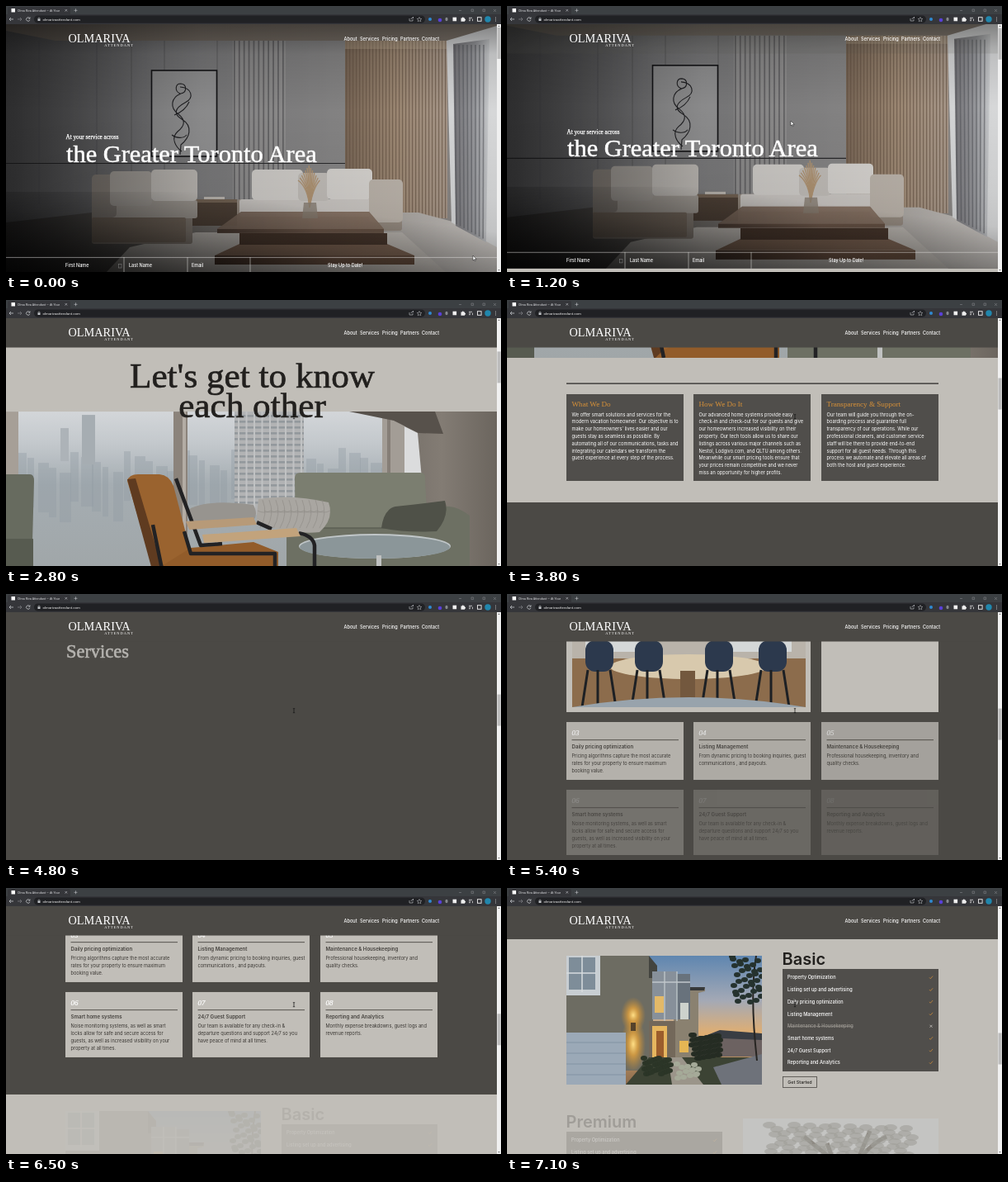
Animation, 600 px wide and 322 px high, one loop 7200 ms. Source, as an HTML page:

```html
<!DOCTYPE html>
<html lang="en">
<head>
<meta charset="utf-8">
<title>Scrolling site</title>
<style>
html, body { margin: 0; width: 600px; height: 322px; overflow: hidden; background: #4b4945 }
svg { display: block }
text { font-family: Inter, "Open Sans", sans-serif; white-space: pre }
.serif { font-family: "Liberation Serif", "Noto Serif", serif }
.ui { font-family: Roboto, "Open Sans", sans-serif }
</style>
</head>
<body>
<svg id="stage" width="600" height="322" viewBox="0 0 600 322"></svg>
<script>
const LIGHT = '#c1beb8', DARK = '#4b4945', PANEL = '#504e4b', INK = '#22201e', GOLD = '#c88a3c';

const rect = (x, y, w, h, fill, more = '') => `<rect x="${x}" y="${y}" width="${w}" height="${h}" fill="${fill}" ${more}/>`;
const path = (d, fill, more = '') => `<path d="${d}" fill="${fill}" ${more}/>`;
const line = (d, stroke, width = 1, more = '') => path(d, 'none', `stroke="${stroke}" stroke-width="${width}" ${more}`);
const oval = (x, y, rx, ry, fill, more = '') => `<ellipse cx="${x}" cy="${y}" rx="${rx}" ry="${ry}" fill="${fill}" ${more}/>`;
const text = (x, y, size, str, fill, more = '') =>
  `<text x="${x}" y="${y}" font-size="${size}" fill="${fill}" ${more}>${str.replace(/&/g, '&amp;')}</text>`;
const serif = (x, y, size, str, fill, bold = 0, more = '') =>
  text(x, y, size, str, fill, `class="serif" stroke="${fill}" stroke-width="${bold}" ${more}`);
const lines = (x, y, list, fill) => list.split('|').map((s, i) => text(x, y + i * 8.8, 5.65, s, fill)).join('');
const repeat = (n, draw) => Array.from({ length: n }, (_, i) => draw(i)).join('');
const fade = (start, length, inner) => `<g data-start="${start}" data-length="${length}">${inner}</g>`;
const grad = (id, dir, ...stops) => `<linearGradient id="${id}" ${dir}>` + stops.map(([at, color, alpha = 1]) =>
  `<stop offset="${at}" stop-color="${color}" stop-opacity="${alpha}"/>`).join('') + '</linearGradient>';
const across = 'x1="0" x2="1" y1="0" y2="0"', down = 'x1="0" x2="0" y1="0" y2="1"';

const defs = '<defs>' +
  grad('wall', across, [0, '#59595b'], [.3, '#808082'], [.7, '#8c8b8b'], [1, '#8a8683']) +
  grad('wood', across, [0, '#7d6a59'], [.5, '#a08b76'], [1, '#a8988a']) +
  grad('drape', across, [0, '#77767a'], [.6, '#96979b'], [1, '#c9cbcd']) +
  grad('floor', across, [0, '#3d3b3a'], [.5, '#8a8580'], [1, '#c9c5c1']) +
  grad('shade', across, [0, '#000', .5], [.4, '#000', .12], [1, '#000', 0]) +
  grad('sink', down, [0, '#000', .4], [.12, '#000', .12], [.35, '#000', 0], [.7, '#000', .05], [1, '#000', .15]) +
  grad('corner', 'x1="0" x2=".8" y1="1" y2="0"', [0, '#000', .85], [.5, '#000', .25], [.8, '#000', 0]) +
  grad('table', across, [0, '#46342a'], [.6, '#6f5545'], [1, '#644c3c']) +
  grad('city', down, [0, '#d3d6d9'], [.2, '#c3c8cc'], [.45, '#a5adb2'], [1, '#a0a6a8']) +
  grad('concrete', across, [0, '#77716a'], [.4, '#837c74'], [1, '#6b655e']) +
  grad('dusk', down, [0, '#5f86b0'], [.35, '#a4a9b5'], [.6, '#dfae72'], [1, '#8a6a4d']) +
  '<radialGradient id="glow"><stop offset="0" stop-color="#ffdf86"/><stop offset=".4" stop-color="#e3a23c" stop-opacity=".8"/><stop offset="1" stop-color="#c98a2c" stop-opacity="0"/></radialGradient>' +
  '<clipPath id="photo"><rect y="430" width="595" height="195"/></clipPath>' +
  '<clipPath id="house"><rect x="72" y="1293" width="237" height="156"/></clipPath>' +
  '<clipPath id="dining"><rect x="79" y="905" width="283" height="144"/></clipPath></defs>';

function hero() {
  const figure = 'M211 106c-7-3-6-12 1-12 8 1 7 11 0 12-12 5-14 17-3 25 9 7 8 14-1 21-9 8-2 19 5 24m-2-78c14 1 18 13 6 19-13 7-14 14-4 20 15 9 9 23-1 31l-1 12m-7-48c8-3 15-9 18-16m-21 40c5 4 14 5 18 0';
  const cushion = (x, y, w, h, fill) => rect(x, y, w, h, fill, 'rx="5"');
  return rect(0, 22, 595, 250, 'url(#wall)') +
    path('M0 22H595V28L535 42H60L0 30z', '#7d746b') +
    line('M40 42V240M110 42V235M152 42V235M192 42V235M256 42V190', '#5a5a5c', .7) +
    rect(275, 42, 64, 192, '#959494') + repeat(11, i => rect(276 + i * 5.9, 42, 1.7, 192, '#69686a')) +
    line('M0 190.5H411', '#2a2a2c', 1.2) +
    rect(411, 42, 124, 215, 'url(#wood)') + repeat(31, i => rect(412 + i * 4, 42, 1.2, 215, '#6a5848', 'opacity=".7"')) +
    rect(411, 42, 124, 10, '#d8c3a6', 'opacity=".3"') +
    path('M0 262L104 250H500L545 262L595 285V324H0z', 'url(#floor)') +
    path('M534 42L595 24V292L540 262z', '#d6d7d8') +
    path('M542 46L586 40L582 286L545 266z', 'url(#drape)') +
    repeat(8, i => line(`M${544 + i * 5} 47L${546 + i * 4.6} ${264 + i * 2.5}`, '#55565b', 1.5, 'opacity=".6"')) +
    rect(176.5, 78, 79, 104, '#9c9c9d', 'stroke="#161618" stroke-width="1.6"') +
    line(figure, '#232326', 1.1) +
    path('M150 292L230 274H480L535 324H120z', '#c2bdb7') +
    rect(213, 234, 67, 32, '#54463b') + rect(213, 234, 67, 4, '#796858') + rect(240, 231, 25, 3, '#c8c3bc') +
    rect(104, 238, 122, 50, '#8d847b', 'rx="3"') + rect(128, 235, 104, 22, '#aaa49d', 'rx="3"') +
    rect(104, 256, 114, 30, '#7d7064', 'rx="2"') +
    cushion(104, 204, 30, 52, '#8d867f') + cushion(126, 200, 51, 42, '#ada8a2') + cushion(176, 198, 56, 38, '#c6c2bd') +
    rect(280, 234, 200, 38, '#9c9186', 'rx="3"') + rect(283, 234, 186, 21, '#d2ceca', 'rx="3"') +
    cushion(298, 198, 62, 37, '#dad7d3') + cushion(354, 202, 38, 34, '#c9c5c0') + cushion(389, 197, 55, 37, '#dcd9d5') +
    cushion(440, 210, 41, 52, '#bfb7ae') +
    path('M283 288H462L495 302H253z', '#7d6453') + rect(253, 302, 242, 11, 'url(#table)') +
    rect(283, 275, 179, 14, '#4b392e') +
    path('M285 249H440L458 270V275H256V270z', 'url(#table)', 'opacity=".85"') +
    path('M285 249H440L458 270H256z', '#9b8779', 'opacity=".6"') +
    repeat(13, i => line(`M368 244Q${366 + i * .5} 220 ${354 + i * 2.2} ${193 + Math.abs(6 - i) * 3}`, '#b79a78', 1.4)) +
    path('M361 238h15l2 19h-19z', '#8f8478', 'opacity=".8"') +
    rect(0, 22, 595, 302, 'url(#shade)') + rect(0, 22, 595, 302, 'url(#sink)') + rect(0, 225, 595, 99, 'url(#corner)') +
    serif(72.5, 161, 7.2, 'At your service across', '#fff', .25) +
    serif(73, 188.5, 30.4, 'the Greater Toronto Area', '#fff', .5) +
    line('M0 304.4H595M143 304V324M220 304V324M296 304V324', '#e4e2df', .6, 'opacity=".85"') +
    [[72, 'First Name'], [149, 'Last Name'], [225, 'Email'], [390, 'Stay Up to Date!']]
      .map(([x, s]) => text(x, 316.4, 5.5, s, '#fff', 'font-weight="500"')).join('') +
    rect(136.5, 312.5, 3.5, 4.5, 'none', 'stroke="#777" stroke-width=".6"');
}

function lounge() {
  const block = i => rect(i * 13, 474 + (i * 37 % 31), 7 + i * 5 % 9, 60, '#929ca3', 'opacity=".4"');
  return '<g clip-path="url(#photo)">' + rect(0, 430, 595, 195, 'url(#city)') + repeat(36, block) +
    rect(92, 434, 16, 60, '#a6adb2') + rect(66, 450, 10, 40, '#adb3b8') +
    rect(277, 430, 84, 125, '#b2b3b4') + repeat(16, i => rect(277, 434 + i * 7, 84, 2.5, '#92989c')) +
    repeat(9, i => rect(281 + i * 9.5, 430, 2, 120, '#c0c2c3')) +
    rect(0, 430, 15, 195, '#a69f97') + rect(203, 430, 17, 195, '#8b837b') + rect(214, 430, 4, 195, '#b3aca4') +
    rect(456, 430, 27, 195, '#a39d96') + rect(462, 430, 4, 195, '#857e77') +
    path('M483 430H595V625H483z', 'url(#concrete)') + path('M483 448L499 456L507 545H483z', '#dbdcdd') +
    path('M416 430H520L530 457L500 456L470 441z', '#57514b') +
    path('M350 510Q350 504 357 504H502Q509 504 508 512L512 590H351z', '#7b7e70') +
    path('M340 570H512V548Q540 538 562 556V625H340z', '#6d7063') + line('M350 571H510', '#585b4f') +
    path('M0 506H29Q34 506 34 514L31 625H0z', '#676b5f') + rect(0, 584, 33, 41, '#575b50') +
    path('M455 571Q458 548 472 545Q500 542 532 538Q538 556 522 575Q485 577 455 571z', '#4f5148') +
    path('M219 550Q240 535 300 543Q309 560 291 568H225z', '#97948f') +
    path('M306 536Q345 529 391 540Q398 560 380 576Q345 579 303 565z', '#a9a6a1') +
    repeat(10, i => line(`M${311 + i * 8} 537q7 17 -3 34M${305 + i * 8} 550q8 4 16 0`, '#8d8a85', .6)) +
    oval(447, 593, 92, 15, '#c0c6c8') + oval(447, 594, 91, 14, '#8b9699') + line('M452 604V625', '#c0c2c1', 6) +
    path('M147 514Q149 506 160 506H186Q198 507 203 520L224 600V625H180z', '#9a632f') +
    path('M147 512L157 511L191 625H178z', '#5f3b20') + path('M187 618L224 595L300 588L330 600V625H180z', '#925c2a') +
    line('M206 511L236 592L262 590M178 567L190 625M216 575L224 602H326V625M304 564L322 572M355 577Q372 580 374 592V625', '#222224', 4.5, 'stroke-linejoin="round"') +
    path('M218 563L300 558L304 567L222 573z', '#b79a78') + path('M238 579L352 571L357 581L240 589z', '#c2a37c') + '</g>';
}

function dining() {
  return '<g clip-path="url(#dining)">' + rect(79, 905, 283, 144, '#b9b3aa') + rect(79, 990, 283, 59, '#8c6c4c') +
    rect(95, 912, 70, 70, '#d5d8d8') + rect(270, 912, 75, 70, '#d5d8d8') +
    oval(220, 1000, 95, 15, '#d8c9ad') + rect(210, 1005, 18, 44, '#73583e') +
    [110, 170, 255, 320].map(x => rect(x - 15, 968, 34, 38, '#2c394d', 'rx="12"') +
      line(`M${x - 12} 1004l-7 45M${x + 15} 1004l7 45M${x} 1004v45`, '#1d2024', 3)).join('') +
    path('M79 1049Q220 1025 362 1049z', '#98a3ac') + '</g>';
}

function serviceCard(x, y, w, h, num, title, body, start) {
  return fade(start, 500, rect(x, y, w, h, LIGHT) +
    serif(x + 6.5, y + 16, 9, num, '#fff', .2, 'font-style="italic"') + line(`M${x + 6.5} ${y + 21.7}H${x + w - 6}`, '#4a4742', .9) +
    text(x + 6.5, y + 32.5, 6.1, title, '#45423e', 'font-weight="600"') + lines(x + 6.5, y + 43.5, body, '#3a3733'));
}

function services() {
  return fade(4250, 900, serif(73, 851, 22.4, 'Services', '#eceae6', .6)) +
    serviceCard(72, 865, 296, 190, '01', 'Property Optimization', '', 4800) + fade(4800, 500, dining()) +
    serviceCard(381, 865, 142, 190, '02', 'Listing set up and advertising', 'We prepare your listing and present|it across every major channel.', 4850) +
    serviceCard(72, 1067, 142, 70, '03', 'Daily pricing optimization', 'Pricing algorithms capture the most accurate|rates for your property to ensure maximum|booking value.', 5000) +
    serviceCard(226, 1067, 142, 70, '04', 'Listing Management', 'From dynamic pricing to booking inquiries, guest|communications , and payouts.', 5030) +
    serviceCard(381, 1067, 142, 70, '05', 'Maintenance & Housekeeping', 'Professional housekeeping, inventory and|quality checks.', 5060) +
    serviceCard(72, 1149, 142, 79, '06', 'Smart home systems', 'Noise monitoring systems, as well as smart|locks allow for safe and secure access for|guests, as well as increased visibility on your|property at all times.', 5200) +
    serviceCard(226, 1149, 142, 79, '07', '24/7 Guest Support', 'Our team is available for any check-in &|departure questions and support 24/7 so you|have peace of mind at all times.', 5230) +
    serviceCard(381, 1149, 142, 79, '08', 'Reporting and Analytics', 'Monthly expense breakdowns, guest logs and|revenue reports.', 5260);
}

function infoCards() {
  const card = (x, title, body) => rect(x, 669, 142, 105, PANEL) + serif(x + 6.5, 684, 9.1, title, GOLD, .1) + lines(x + 6.5, 695.5, body, '#fff');
  return fade(2900, 700, rect(72, 655.5, 451, 1.2, INK) +
    card(72, 'What We Do', "We offer smart solutions and services for the|modern vacation homeowner. Our objective is to|make our homeowners' lives easier and our|guests stay as seamless as possible. By|automating all of our communications, tasks and|integrating our calendars we transform the|guest experience at every step of the process.") +
    card(226, 'How We Do It', 'Our advanced home systems provide easy|check-in and check-out for our guests and give|our homeowners increased visibility on their|property. Our tech tools allow us to share our|listings across various major channels such as|Nestol, Lodgivo.com, and QLTU among others.|Meanwhile our smart pricing tools ensure that|your prices remain competitive and we never|miss an opportunity for higher profits.') +
    card(381, 'Transparency & Support', 'Our team will guide you through the on-|boarding process and guarantee full|transparency of our operations. While our|professional cleaners, and customer service|staff will be there to provide end-to-end|support for all guest needs. Through this|process we automate and elevate all areas of|both the host and guest experience.'));
}

function house() {
  const leaves = (n, x, y, w, h, fill) => repeat(n, i => oval(x + i * 23 % w, y + i * 31 % h, 4, 3, fill));
  return '<g clip-path="url(#house)">' + rect(72, 1293, 237, 156, 'url(#dusk)') +
    path('M72 1293H172L177 1306V1432H72z', '#6d6c62') + path('M172 1293L182 1305V1320H172z', '#43443f') +
    path('M202 1334L240 1332V1336L232 1338V1420H202z', '#8a8170') + path('M200 1331L240 1331L239 1335H200z', '#37393a') +
    rect(72, 1293, 41, 48, '#c8ced2') + rect(75, 1295, 32, 39, '#7e8d99') + line('M91 1293V1337M72 1314H108', '#d8dcde', 1.5) +
    rect(176, 1312, 30, 58, '#87909a') + rect(206, 1315, 16, 55, '#68727c') + line('M176 1325H222M191 1312V1372M206 1312V1372', '#c1c8cc', 1.3) +
    rect(179, 1342, 11, 20, '#e3b968') + rect(210, 1350, 10, 20, '#cdd2cd') +
    rect(172, 1372, 32, 45, '#73685a') + rect(176, 1378, 18, 38, '#e6b65f') + rect(181, 1384, 9, 32, '#9b5d2c') +
    oval(153, 1365, 15, 22, 'url(#glow)') + oval(153, 1400, 15, 34, 'url(#glow)') + rect(150, 1374, 6, 10, '#55432b') +
    rect(72, 1386, 72, 63, '#9ba9b7') + repeat(4, i => line(`M72 ${1398 + i * 13}H144`, '#8190a0', .9)) +
    rect(232, 1390, 77, 25, '#6c6261') + path('M235 1392L258 1383L309 1387V1395z', '#393d43') +
    path('M144 1449L172 1416H309V1449z', '#3c4334') + path('M195 1416H212L238 1449H200z', '#9b958a') +
    path('M250 1428L309 1412V1449H260z', '#6e727a') + rect(209, 1396, 11, 14, '#e5b654') +
    leaves(45, 224, 1389, 35, 29, '#252c23') + leaves(30, 166, 1417, 34, 20, '#2b3527') +
    line('M302 1293Q294 1340 303 1420', '#272522', 2) + leaves(36, 273, 1294, 37, 56, '#25322e') + leaves(14, 206, 1424, 28, 18, '#a5aa98') + '</g>';
}

function plan(x, y, name, button) {
  const items = ['Property Optimization', 'Listing set up and advertising', 'Daily pricing optimization', 'Listing Management',
    'Maintenance & Housekeeping', 'Smart home systems', '24/7 Guest Support', 'Reporting and Analytics'];
  return text(x - .5, y - 5, 20, name, INK, 'font-weight="600"') + rect(x, y, 189, 124, PANEL) + items.map((s, i) => {
    const row = y + 12.4 + i * 14.72, out = button && i == 4;
    return text(x + 6, row, 5.6, s, out ? '#9b9791' : '#fff', 'font-weight="500"' + (out ? ' text-decoration="line-through"' : '')) +
      (out ? line(`M${x + 178.5} ${row - 3.5}l3 3m0 -3l-3 3`, '#d5d2cc', .7) : line(`M${x + 178} ${row - 2}l1.3 1.4l2.8 -3.2`, GOLD, .8));
  }).join('') + (button ? rect(x + .5, y + 130.5, 41, 13, 'none', `stroke="${DARK}" stroke-width=".8"`) +
    text(x + 21, y + 139, 5.4, 'Get Started', INK, 'text-anchor="middle" font-weight="500"') : '');
}

function treePhoto() {
  return rect(286, 1490, 237, 156, '#c8cbcd') +
    line('M410 1646Q404 1560 388 1520M408 1590Q420 1530 460 1512M395 1540L360 1512M425 1540L440 1505', '#5d5850', 5) +
    repeat(75, i => oval(318 + i * 61 % 176, 1498 + i * 29 % 38, 8, 4, '#7f8079', 'opacity=".6"'));
}

const page = hero() + rect(0, 324, 595, 476, LIGHT) + fade(2000, 700, lounge()) +
  fade(1550, 900, ["Let's get to know", 'each other'].map((s, i) =>
    serif(298.5, 401 + i * 36, 43.2, s, INK, .7, 'text-anchor="middle"')).join('')) +
  infoCards() + rect(0, 800, 595, 473, DARK) + services() + rect(0, 1273, 595, 400, LIGHT) +
  fade(6400, 600, house() + plan(334, 1309, 'Basic', true)) +
  fade(6900, 700, plan(72, 1506, 'Premium', false)) + fade(6800, 600, treePhoto());

const header = serif(75.5, 43.8, 14.3, 'OLMARIVA', '#fff') +
  text(155, 49.4, 4.5, 'ATTENDANT', '#fff', 'class="serif" text-anchor="end" letter-spacing="1"') +
  [[409.5, 'About'], [429, 'Services'], [456, 'Pricing'], [478, 'Partners'], [504, 'Contact']]
    .map(([x, s]) => text(x, 41.8, 5.6, s, '#fff', 'font-weight="500"')).join('');

const grey = '#c4c7cb';
const browser = rect(0, 0, 600, 11, '#3c4043') + rect(2, 1, 76, 12, '#35363a', 'rx="2"') + rect(0, 10, 600, 12, '#35363a') +
  rect(6.5, 3, 4.5, 4.5, '#fff') + text(14, 6.8, 3.75, 'Olma Riva Attendant — At Your', '#dcdde0', 'class="ui"') +
  line('M71.5 4l2.6 2.6m0 -2.6l-2.6 2.6M82.5 5.3h4m-2 -2v4', grey, .6) +
  line('M549 5.5h3M564 4h2.6v2.6h-2.6zM578 4h2.6v2.6h-2.6zM591 4l3 3m0 -3l-3 3', '#8c8e92', .5) +
  rect(34, 11.5, 474, 9.2, '#202124', 'rx="4.6"') +
  line('M9 16H4m2 -2l-2 2l2 2', grey, .8) + line('M14 16h5m-2 -2l2 2l-2 2', '#7b7d81', .8) + line('M28.5 14.7a2.2 2.2 0 1 0 .4 2M29 13.5v1.7h-1.7', grey, .8) +
  rect(38.5, 15.5, 3, 2.5, grey) + line('M39 15.7v-.7a1 1 0 0 1 2 0v.7', grey, .5) +
  text(44.5, 17.8, 4.4, 'olmarivaattendant.com', '#eee', 'class="ui"') +
  line('M489 15v3h4v-2m-2 0q0 -2 3 -2m-1 -1l1 1l-1 1', grey, .6) +
  line('M501 13.5l.8 1.8l2 .2l-1.5 1.3l.5 2l-1.8 -1l-1.8 1l.5 -2l-1.5 -1.3l2 -.2z', grey, .5) +
  oval(514, 16, 2, 2, '#2f8ad0') + oval(526, 17, 2.3, 2.3, '#5940d8') + oval(534, 16, 1.6, 2.2, '#85888d') +
  rect(541.5, 13.7, 4.6, 4.6, '#f1f1f1') + path('M551.5 14.5h1.3a1 1 0 0 1 2 0h1.3v1.3a1 1 0 0 1 0 2v1h-4.6z', '#eee') +
  line('M561 14.3h4m-4 1.7h2.5m-2.5 1.7h2m2.5 -2v2.5', '#eee', .7) + rect(571.5, 13.7, 4.6, 4.6, 'none', 'stroke="#eee" stroke-width=".9"') +
  oval(584, 16, 3.7, 3.7, '#2187ad') + repeat(3, i => oval(593.5, 14 + i * 2, .5, .5, '#ddd'));

const stage = document.getElementById('stage');
stage.innerHTML = defs + `<g id="page">${page}</g>` + rect(0, 22, 595, 35.5, DARK, 'id="bar"') + header +
  rect(595, 22, 5, 300, '#f0f0f0') + path('M596.3 25l1.2 -1.4l1.2 1.4zM596.3 319l1.2 1.4l1.2 -1.4z', '#666') +
  rect(595.5, 0, 4.2, 38, '#bcbcbc', 'id="thumb"') + browser +
  path('M0 0V6L1.4 4.8L2.3 6.8L3.2 6.4L2.3 4.4H4.2z', '#fff', 'id="arrow" stroke="#111" stroke-width=".5"') +
  line('M347.8 138.7h2.4m-1.2 0v5m-1.2 0h2.4', '#141414', .7, 'id="beam"');

const [pageEl, bar, thumb, arrow, beam] = ['page', 'bar', 'thumb', 'arrow', 'beam'].map(id => document.getElementById(id));
const fades = [...stage.querySelectorAll('[data-start]')];

// Each scroll gesture: start, end, distance
const scrolls = [[1130, 1830, 219], [2523, 3423, 336], [3830, 4430, 219], [5000, 5650, 206], [6340, 6920, 231]];
const ease = (t, from, to) => {
  const u = Math.min(1, Math.max(0, (t - from) / (to - from)));
  return u * u * (3 - 2 * u);
};

function draw() {
  const t = Math.floor(performance.now() % 7200 / 100) * 100;
  const y = scrolls.reduce((sum, [from, to, dist]) => sum + dist * ease(t, from, to), 0);
  pageEl.setAttribute('transform', `translate(0 ${-y})`);
  thumb.setAttribute('y', 26 + y / 8.1);
  bar.setAttribute('opacity', ease(t, 1130, 1430));
  for (const el of fades) el.setAttribute('opacity', ease(t, +el.dataset.start, +el.dataset.start + +el.dataset.length));
  const move = ease(t, 450, 1100);
  arrow.setAttribute('transform', `translate(${566 - 222 * move} ${302 - 163 * move})`);
  arrow.setAttribute('opacity', t < 2500 ? 1 : 0);
  beam.setAttribute('opacity', t < 2500 ? 0 : 1);
  requestAnimationFrame(draw);
}
draw();
</script>
</body>
</html>
```
